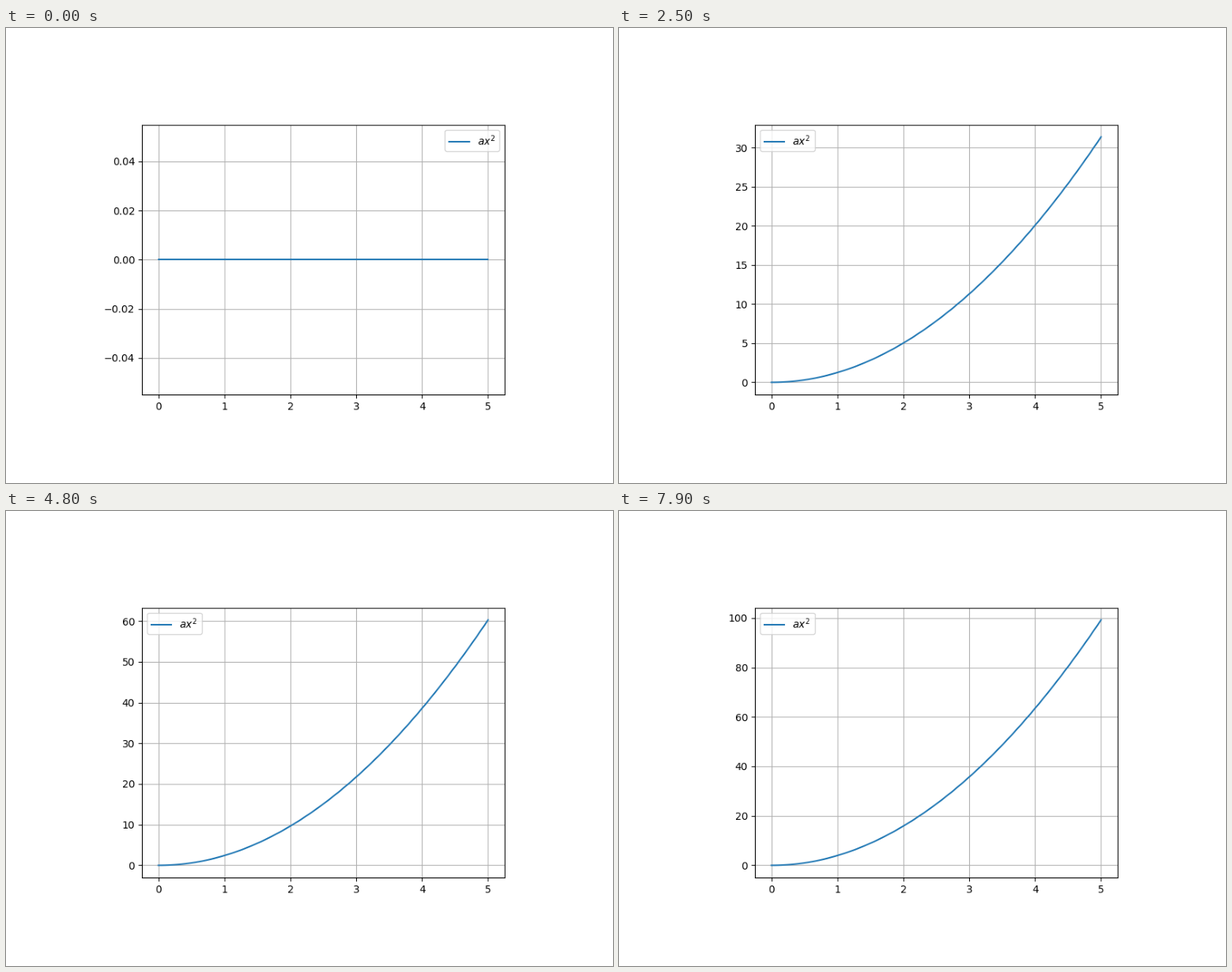
Write a matplotlib script that moves like this. It is 768x576 px and loops after 8 s.

```python
import numpy as np
import matplotlib.pyplot as plt
from matplotlib.animation import FuncAnimation

W, H, DPI = 768, 576, 100
FRAMES, INTERVAL = 80, 100

# The chart is laid out on a 640x480 page, then shown slightly smaller.
PAGE_W, PAGE_H = 640, 480
VIEW_X, VIEW_Y, VIEW_W, VIEW_H = 98, 69, 592, 444

fig = plt.figure(figsize=(W / DPI, H / DPI), dpi=DPI, facecolor="white")
ax = fig.add_axes([
    0.125 * PAGE_W / W,
    1 - 0.89 * PAGE_H / H,
    0.775 * PAGE_W / W,
    0.77 * PAGE_H / H,
])

x = np.linspace(0, 5, 100)
coeffs = np.linspace(0, 10, 200)


def shrink(img, size, axis):
    """Resample one axis with a Hann kernel."""
    n = img.shape[axis]
    scale = size / n
    pos = (np.arange(size) + 0.5) / scale
    near = np.floor(pos).astype(int)
    taps = near + np.array([[-1], [0], [1]])
    dist = np.minimum(np.abs(taps + 0.5 - pos) * scale, 1)
    weights = 0.5 + 0.5 * np.cos(np.pi * dist)
    weights = (weights / weights.sum(axis=0)).astype(np.float32)
    shape = [1, 1, 1]
    shape[axis] = size
    return sum(np.take(img, np.clip(t, 0, n - 1), axis=axis) * w.reshape(shape)
               for t, w in zip(taps, weights))


def show_page(img, dpi):
    """Scale the page down and place it on a white stage."""
    page = img[:PAGE_H, :PAGE_W, :3].astype(np.float32)
    page = shrink(shrink(page, VIEW_H, 0), VIEW_W, 1)
    out = np.full(img.shape, 255, np.uint8)
    out[VIEW_Y:VIEW_Y + VIEW_H, VIEW_X:VIEW_X + VIEW_W, :3] = np.rint(page * 255)
    return out, 0, 0


def update(i):
    """Redraw the parabola with autoscaled axes for the i-th coefficient."""
    ax.clear()
    ax.plot(x, coeffs[i] * x**2, label="$ax^2$")
    ax.grid(True)
    ax.legend(loc="best")
    return ax.lines


fig.set_agg_filter(show_page)
anim = FuncAnimation(fig, update, frames=FRAMES, interval=INTERVAL,
                     repeat=True, repeat_delay=0, blit=False)
plt.show()
```
